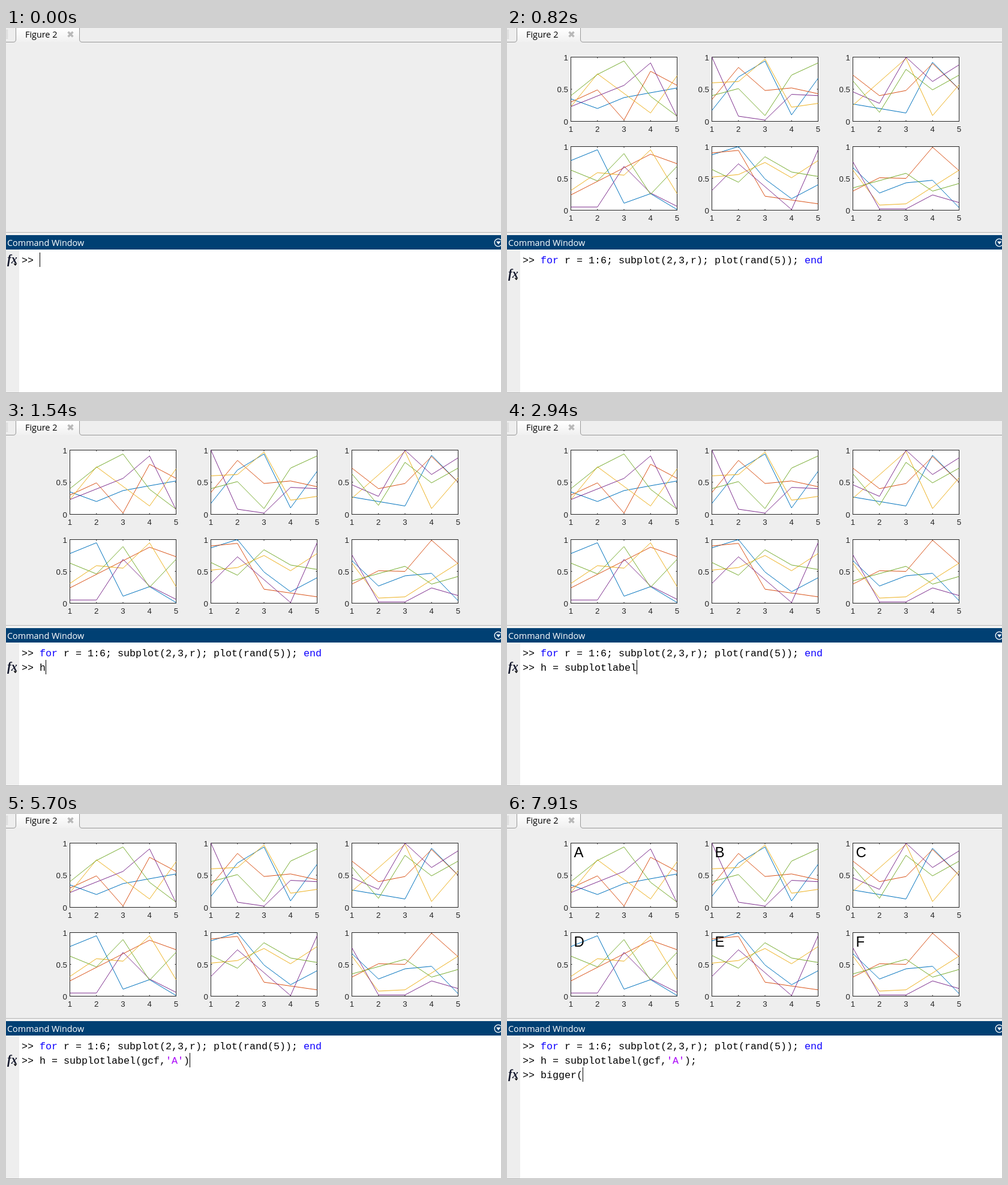
Recreate the animation shown at these times as an HTML page. Size 825 by 608 pixels, loop 8 s.

```html
<!DOCTYPE html>
<html>
<head>
<meta charset="utf-8">
<style>
html, body { margin: 0; width: 100%; height: 100%; overflow: hidden; background: #eee; }
svg { display: block; }
text { white-space: pre; }
.ui { font: 14.4px "Open Sans", "Noto Sans", sans-serif; }
.tick { font: 13.3px "Liberation Sans", Arial, sans-serif; fill: #262626; }
.label { font: 24px "Liberation Sans", Arial, sans-serif; fill: #000; }
.code { font: 16.667px "Liberation Mono", "Courier New", monospace; }
.fx { font: italic bold 20px "Liberation Serif", serif; fill: #14182c; }
</style>
</head>
<body>
<svg id="stage" width="825" height="608" viewBox="0 0 825 608">
  <defs>
    <linearGradient id="tabFill" x2="0" y2="1">
      <stop offset="0" stop-color="#fff"/><stop offset="1" stop-color="#f0f0f0"/>
    </linearGradient>
  </defs>
  <rect width="825" height="608" fill="#eee"/>

  <path d="M16.5 0V19Q16.5 23.5 12 23.5H126.5Q122.5 23.5 122.5 19V0Z" fill="url(#tabFill)"/>
  <path d="M0 23.5H12Q16.5 23.5 16.5 19V0M122.5 0V19Q122.5 23.5 127 23.5H825" fill="none" stroke="#999"/>
  <path d="M.5 3V18M2.5 3V18" stroke="#bbb" stroke-dasharray="1 1"/>
  <text class="ui" x="32" y="16">Figure 2</text>
  <path d="M103.5 6.5L111.5 14.5M111.5 6.5L103.5 14.5" stroke="#b8b8b8" stroke-width="3.4"/>

  <g id="plots"></g>
  <g id="labels"></g>

  <rect y="341" width="825" height="4" fill="#f2f2f2"/>
  <rect id="divider" y="340" width="825" height="1"/>
  <rect id="header" y="345" width="825" height="24"/>
  <g id="headerInk">
    <text class="ui" x="2" y="363">Command Window</text>
    <circle cx="820.5" cy="357.5" r="6.3" fill="none" stroke="currentColor" stroke-width="1.3"/>
    <path d="M817 355.5H824.5L820.7 360.5Z"/>
  </g>

  <rect x="22" y="369" width="803" height="238" fill="#fff"/>
  <rect y="607" width="825" height="1" fill="#b4b4b4"/>
  <g id="fx">
    <text class="fx" x="2" y="392">fx</text>
    <path d="M12.5 392.5H18.5L15.5 396Z"/>
  </g>
  <g id="console" class="code"></g>
  <g id="parens" fill="#262626">
    <rect x="217" y="418" width="9" height="1"/><rect x="297" y="418" width="9" height="1"/>
  </g>
  <rect id="caret" width="1" height="24"/>
</svg>
<script>
const DURATION = 8000, CELL = 10, TEXT_X = 56, LINE_H = 24;
const KEYWORD = '#0e00ff', STRING = '#aa04f9', OPEN_STRING = '#b20000';
const SERIES = ['#0072bd', '#d95319', '#edb120', '#7e2f8e', '#77ac30'];
const $ = id => document.getElementById(id);

// Lines per plot, in percent of the axis height; gaps lie on a straight segment.
const plots = [
  [[35,20,37,,52], [30,49,2,78,56], [23,74,,13,71], [23,,56,91,7], [40,73,94,39,8]],
  [[17,69,94,10,67], [34,84,48,52,43], [60,62,97,22,28], [100,8,2,42,40], [40,51,9,72,91]],
  [[27,,13,92,50], [72,40,48,90,50], [25,,98,9,57], [46,28,100,62,88], [63,14,81,49,72]],
  [[78,95,11,26,1], [24,,,88,73], [31,59,55,95,26], [5,5,69,27,6], [63,46,89,25,69]],
  [[87,100,49,18,40], [90,94,22,,10], [52,56,75,51,78], [31,73,,1,95], [64,44,84,60,53]],
  [[67,27,43,47,4], [30,51,50,99,62], [63,8,10,,63], [76,2,2,24,12], [35,,58,30,42]]
];

function drawPlot(lines, index) {
  const left = 106.5 + 235 * (index % 3), top = index < 3 ? 48.5 : 197.5;
  const w = 177, h = index < 3 ? 107 : 106, bottom = top + h;
  const px = i => left + i * w / 4, py = v => bottom - v * h / 100;
  let ticks = '', out = `<rect x="${left}" y="${top}" width="${w}" height="${h}" fill="#fff"/>`;
  for (let i = 0; i < 5; i++) {
    ticks += `M${px(i)} ${bottom}v-2M${px(i)} ${top}v2`;
    out += `<text class="tick" text-anchor="middle" x="${px(i)}" y="${bottom + 17}">${i + 1}</text>`;
  }
  for (let v = 0; v <= 100; v += 50) {
    ticks += `M${left} ${py(v)}h2M${left + w} ${py(v)}h-2`;
    out += `<text class="tick" text-anchor="end" x="${left - 4.5}" y="${py(v) + 5}">${v / 100}</text>`;
  }
  out += `<path d="M${left} ${top}h${w}v${h}h${-w}z${ticks}" fill="none" stroke="#262626"/>`;
  lines.forEach((values, s) => {
    let points = '';
    values.forEach((v, i) => points += `${px(i)},${py(v)} `);
    out += `<polyline points="${points}" fill="none" stroke="${SERIES[s]}"/>`;
  });
  $('plots').innerHTML += out;
  $('labels').innerHTML += `<text class="label" x="${left + 5}" y="${top + 23.5}">${'ABCDEF'[index]}</text>`;
}
plots.forEach(drawPlot);

// A burst of typing: its text appears in steps of about 100 ms.
const burst = (text, at, end = at) => {
  const steps = Math.min(text.length, Math.round((end - at) / 100) + 1);
  return { text, at, steps, interval: (end - at) / (steps - 1) || 1 };
};

const commands = [
  { start: 0, prompt: 0, enter: 520, bursts: [
    burst('for r = 1:6; subplot(2,3,r); plot(rand(5)); end', 200)] },
  { start: 610, prompt: 910, enter: 6010, bursts: [
    burst('h ', 1540, 1690), burst('= subplot', 1900, 2630), burst('label', 2740, 2940),
    burst('(', 3150), burst('gcf', 3670, 3840), burst(',', 4060), burst("'", 4460),
    burst('A', 4980), burst("'", 5180), burst(')', 5500), burst(';', 5810)] },
  { start: 6120, prompt: 6370, enter: Infinity, bursts: [
    burst('bigger', 7410, 7710), burst('(', 7910)] }
];

function typedAt(command, t) {
  let text = '', lastKey = null;
  for (const b of command.bursts) {
    if (t < b.at) break;
    const step = b.steps === 1 ? 0 : Math.min(b.steps - 1, Math.floor((t - b.at) / b.interval + 1e-6));
    text += b.text.slice(0, Math.round(b.text.length * (step + 1) / b.steps));
    lastKey = b.at + step * b.interval;
  }
  return { text, lastKey };
}

function tokenColor(token) {
  if (token[0] === "'") return /^'.*'$/.test(token) && token.length > 1 ? STRING : OPEN_STRING;
  return /^(for|end)$/.test(token) ? KEYWORD : '#000';
}

function commandMarkup(command, row, t) {
  if (t < command.prompt) return '';
  const y = 392 + row * LINE_H;
  let out = `<text x="26" y="${y}">&gt;&gt;</text>`;
  for (const match of typedAt(command, t).text.matchAll(/'[^']*'?|\w+|[^\w']+/g)) {
    const x = TEXT_X + match.index * CELL;
    out += `<text x="${x}" y="${y}" fill="${tokenColor(match[0])}">${match[0]}</text>`;
  }
  return out;
}

function caretVisible(command, lastKey, focused, t) {
  if (!focused || t < command.prompt || t >= command.enter) return false;
  if (command.start === 0 && lastKey === null) return true;
  const idle = t - (lastKey ?? command.prompt);
  return idle % 520 < (lastKey === null ? 220 : 300);
}

const show = (id, on) => $(id).setAttribute('visibility', on ? 'visible' : 'hidden');

let shown = '';
function render(t) {
  const row = commands.filter(c => t >= c.start).length - 1;
  const command = commands[row], { text, lastKey } = typedAt(command, t);
  const focused = t < 910 || t >= 1540;
  const ink = focused ? '#fff' : '#333';

  show('plots', t >= 820);
  show('labels', t >= 6310);
  show('parens', t >= 5500 && t < 5700);
  show('caret', caretVisible(command, lastKey, focused, t));
  $('caret').setAttribute('x', TEXT_X + text.length * CELL);
  $('caret').setAttribute('y', 374 + row * LINE_H);
  $('fx').setAttribute('transform', `translate(0 ${row * LINE_H})`);
  $('header').setAttribute('fill', focused ? '#004073' : '#dcdfe3');
  $('divider').setAttribute('fill', focused ? '#b4b4b4' : '#004073');
  $('headerInk').setAttribute('fill', ink);
  $('headerInk').setAttribute('color', ink);

  const markup = commands.map((c, i) => commandMarkup(c, i, t)).join('');
  if (markup !== shown) $('console').innerHTML = shown = markup;
}

const origin = performance.now();
function tick() {
  render((performance.now() - origin) % DURATION);
  requestAnimationFrame(tick);
}
tick();
</script>
</body>
</html>
```
